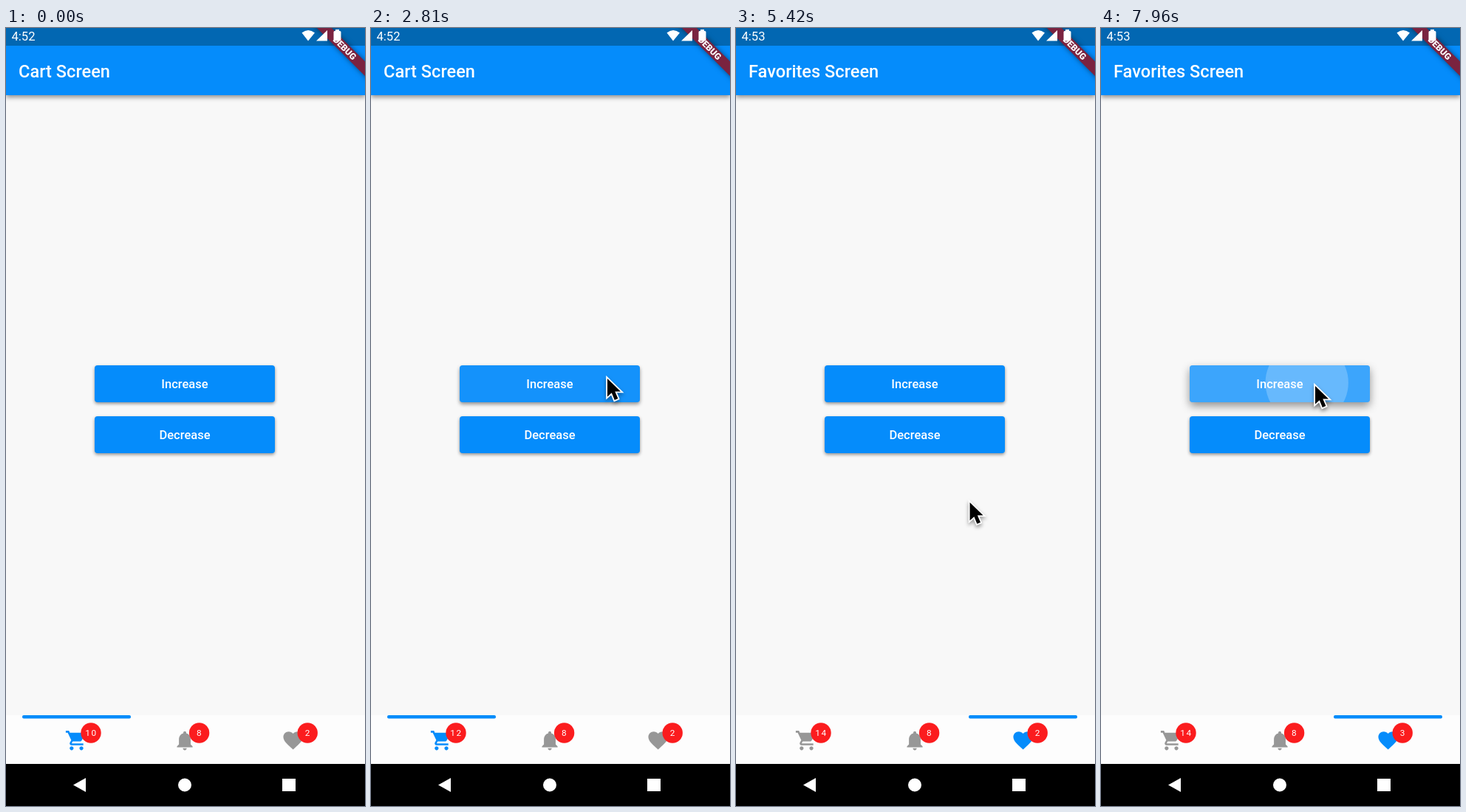
An HTML page with a canvas that plays this animation: 486x1054 px, repeating every 8000 ms.

```html
<!DOCTYPE html>
<html lang="en">
<head>
<meta charset="utf-8">
<title>Badge counter app</title>
<style>
  html, body { margin: 0; width: 100%; height: 100%; overflow: hidden; background: #000; }
  canvas { display: block; }
</style>
</head>
<body>
<canvas id="stage" width="486" height="1054"></canvas>
<script>
const W = 486, H = 1054, LOOP = 8000;
const c = document.getElementById('stage').getContext('2d');
const BLUE = '#058cfb', DARK = '#0267b2', PAGE = '#f8f8f8', NAV = '#fdfdfd',
      GREY = '#979797', RED = '#fb1c1e', INK = '#fff';

const CART = new Path2D('M7 18c-1.1 0-1.99.9-1.99 2S5.9 22 7 22s2-.9 2-2-.9-2-2-2zM1 2v2h2l3.6 7.59-1.35 2.45c-.16.28-.25.61-.25.96 0 1.1.9 2 2 2h12v-2H7.42c-.14 0-.25-.11-.25-.25l.03-.12.9-1.63h7.45c.75 0 1.41-.41 1.75-1.03l3.58-6.49A1 1 0 0 0 20 4H5.21l-.94-2H1zm16 16c-1.1 0-1.99.9-1.99 2s.89 2 1.99 2 2-.9 2-2-.9-2-2-2z');
const BELL = new Path2D('M12 22c1.1 0 2-.9 2-2h-4c0 1.1.89 2 2 2zm6-6v-5c0-3.07-1.64-5.64-4.5-6.32V4c0-.83-.67-1.5-1.5-1.5s-1.5.67-1.5 1.5v.68C7.63 5.36 6 7.92 6 11v5l-2 2v1h16v-1l-2-2z');
const HEART = new Path2D('M12 21.35l-1.45-1.32C5.4 15.36 2 12.28 2 8.5 2 5.42 4.42 3 7.5 3c1.74 0 3.41.81 4.5 2.09C13.09 3.81 14.76 3 16.5 3 19.58 3 22 5.42 22 8.5c0 3.78-3.4 6.86-8.55 11.54L12 21.35z');
const STATUS = new Path2D('M409 17.5L400.5 6.5Q409-.5 418 6.5ZM420 17.5L435 3V17.5ZM445 4H446V2H451V4H452Q453.5 4 453.5 5.5V16Q453.5 17.5 452 17.5H445Q443.5 17.5 443.5 16V5.5Q443.5 4 445 4Z');
const KEYS = new Path2D('M91 1025.5L108 1016V1035ZM251 1025.5a9 9 0 1 1-18 0a9 9 0 1 1 18 0ZM374 1017h18v17h-18Z');
const ARROW = new Path2D('M2 5V29.5L7.8 24.3L11.8 34L16.4 32L12.3 22.5H20Z');

const TABS = [
  { title: 'Cart Screen', icon: CART, x: 95.4, count: 10 },
  { title: 'Notifications Screen', icon: BELL, x: 242, count: 8 },
  { title: 'Favorites Screen', icon: HEART, x: 388.6, count: 2 }
];
const BUTTONS = [{ label: 'Increase', y: 457 }, { label: 'Decrease', y: 526 }];

// Press: down, up, button, tab
const PRESSES = [
  [2100, 2250, 0, 0], [2520, 2670, 0, 0], [2920, 3070, 0, 0], [3300, 3450, 0, 0],
  [5910, 6060, 1, 2], [6330, 6480, 1, 2],
  [6850, 7000, 0, 2], [7270, 7420, 0, 2], [7650, 7800, 0, 2], [7850, 9000, 0, 2]
];
// Pointer: time, x, y
const TRAIL = [
  [1100, 330, 1070], [1650, 318, 470], [3480, 318, 470], [3880, 258, 945], [4330, 364, 959],
  [4950, 364, 959], [5650, 298, 530], [6560, 298, 530], [6800, 288, 480], [LOOP, 288, 480]
];
// The indicator starts slightly after the pages
const SWITCH = { start: 4428, time: 400, lag: 6 }, CLOCK_TICK = 5300, RING = [1730, 1890];

const clamp = v => Math.max(0, Math.min(1, v));
const mix = (a, b, k) => a + (b - a) * k;

// cubic-bezier(.25, .1, .25, 1)
function ease(x) {
  let lo = 0, hi = 1, s;
  for (let i = 0; i < 20; i++) {
    s = (lo + hi) / 2;
    if (.75 * s * (1 - s) + s ** 3 < x) lo = s; else hi = s;
  }
  return .3 * s * (1 - s) ** 2 + 3 * s * s * (1 - s) + s ** 3;
}

function pointer(t) {
  const i = TRAIL.findIndex(p => p[0] > t);
  if (i < 1) return null;
  const [t0, x0, y0] = TRAIL[i - 1], [t1, x1, y1] = TRAIL[i];
  const k = (t - t0) / (t1 - t0), s = k * k * (3 - 2 * k);
  return [mix(x0, x1, s), mix(y0, y1, s)];
}

function text(str, x, y, font, align = 'left', spacing = 0) {
  c.font = font + ' Roboto, sans-serif';
  c.textAlign = align;
  c.letterSpacing = spacing + 'px';
  c.fillStyle = INK;
  c.fillText(str, x, y);
}

function box(x, y, w, h, fill, r = 0) {
  c.fillStyle = fill;
  c.beginPath();
  c.roundRect(x, y, w, h, r);
  c.fill();
}

function disc(x, y, r, fill) {
  c.fillStyle = fill;
  c.beginPath();
  c.arc(x, y, r, 0, 7);
  c.fill();
}

function shaded(alpha, blur, dy, draw) {
  c.save();
  c.shadowColor = `rgba(0,0,0,${alpha})`;
  c.shadowBlur = blur;
  c.shadowOffsetY = dy;
  draw();
  c.restore();
}

function button({ label, y }, index, t) {
  const press = PRESSES.filter(p => p[2] === index && p[0] <= t).pop();
  let glow = 0;
  if (press) glow = clamp((t - press[0]) / 100) * clamp(1 - (t - press[1]) / 180);
  shaded(.42, mix(4, 12, glow), mix(2, 5, glow), () => box(120, y, 244, 50, BLUE, 4));
  if (glow) {
    const [down, up] = press, [px, py] = pointer(down);
    const k = clamp((t - down) / 550 + Math.max(0, t - up) / 120);
    c.save();
    box(120, y, 244, 50, `rgba(255,255,255,${.22 * glow})`, 4);
    c.clip();
    disc(mix(px, 242, k), mix(py, y + 25, k), mix(38, 128, k), `rgba(255,255,255,${.22 * glow * glow})`);
    c.restore();
  }
  text(label, 242, y + 31, '500 16.5px', 'center');
}

function page(tab, x, t) {
  c.save();
  c.translate(x, 0);
  box(0, 91, W, 840, PAGE);
  shaded(.42, 6, 3, () => box(0, 24, W, 67, BLUE));
  text(tab.title, 17, 66.5, '500 23.6px');
  BUTTONS.forEach((b, i) => button(b, i, t));
  c.restore();
}

function banner() {
  c.save();
  c.translate(W, 0);
  c.rotate(Math.PI / 4);
  shaded(.5, 7, 0, () => box(-60, 32, 120, 14, '#7a2340'));
  text('DEBUG', 0, 43, '900 12px', 'center');
  c.restore();
}

function tabBar(t, active, slide) {
  box(0, 931, W, 66, NAV);
  box(mix(22, 315, slide), 931, 147, 4.5, BLUE, 2);
  TABS.forEach((tab, i) => {
    c.save();
    c.translate(tab.x - 15.8, 949.4);
    c.scale(1.32, 1.32);
    c.fillStyle = i === active ? BLUE : GREY;
    c.fill(tab.icon);
    c.restore();
    const count = PRESSES.filter(p => p[3] === i && p[1] <= t)
      .reduce((n, p) => n + (p[2] ? -1 : 1), tab.count);
    disc(tab.x + 19.6, 955, 13.7, RED);
    text(String(count), tab.x + 20.2, 958.8, '400 11.8px', 'center', 1.6);
  });
}

function cursor(t) {
  const at = pointer(t);
  if (!at) return;
  if (t >= RING[0] && t < RING[1]) {
    c.strokeStyle = '#000';
    c.lineWidth = 3;
    c.beginPath();
    c.arc(319, 474, 43.3, 0, 7);
    c.stroke();
  }
  c.save();
  c.translate(...at);
  c.lineWidth = 3.6;
  c.strokeStyle = INK;
  shaded(.4, 5, 3, () => c.stroke(ARROW));
  c.fillStyle = '#000';
  c.fill(ARROW);
  c.restore();
}

function draw(t) {
  const turn = clamp((t - SWITCH.start) / SWITCH.time);
  const slide = clamp((t - SWITCH.start - SWITCH.lag) / SWITCH.time);
  const scroll = turn === 0 ? 0 : turn === 1 ? 2 : 2 * ease(turn);
  TABS.forEach((tab, i) => {
    const x = (i - scroll) * W;
    if (Math.abs(x) < W) page(tab, x, t);
  });
  box(0, 0, W, 24, DARK);
  banner();
  c.fillStyle = INK;
  c.fill(STATUS);
  text(t < CLOCK_TICK ? '4:52' : '4:53', 7.5, 16.5, '400 16.6px');
  tabBar(t, t < SWITCH.start ? 0 : 2, slide);
  box(0, 997, W, H - 997, '#000');
  c.fillStyle = INK;
  c.fill(KEYS);
  cursor(t);
}

const begin = performance.now();
function tick() {
  draw((performance.now() - begin) % LOOP);
  requestAnimationFrame(tick);
}
tick();
</script>
</body>
</html>
```
